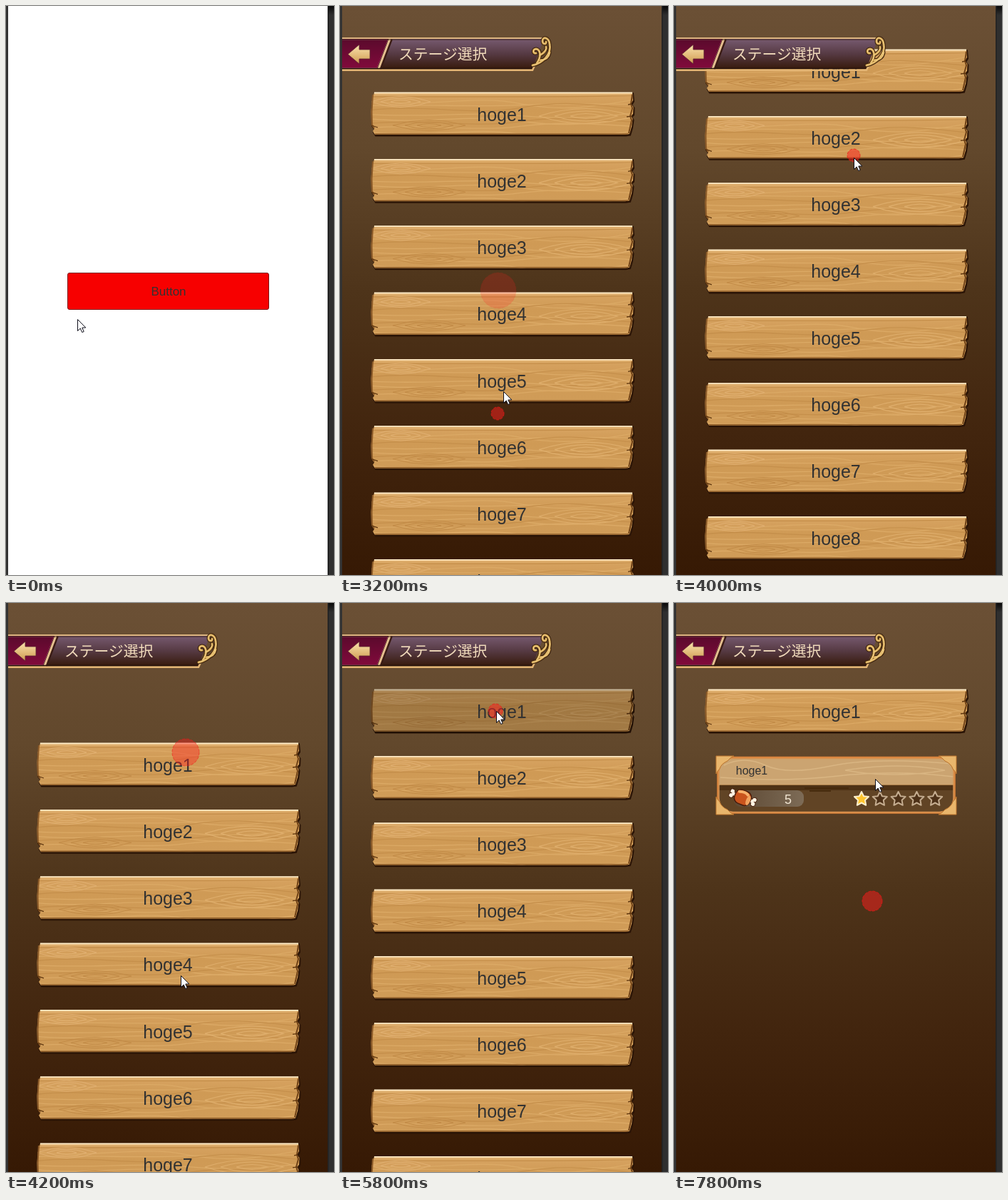
Recreate the animation shown at these times as an HTML page. Size 460 px wide and 796 px high, loop 8000 ms.

```html
<!DOCTYPE html>
<html lang="ja">
<head>
<meta charset="utf-8">
<title>Stage select</title>
<style>
  html, body { margin: 0; width: 100%; height: 100%; overflow: hidden; background: #303030; }
  svg { display: block; width: 460px; height: 796px; }
  text { font-family: "Liberation Sans", Arial, sans-serif; text-anchor: middle; fill: #323232; }
  .title { font: 500 20.8px "Noto Sans CJK JP", "Noto Sans CJK", sans-serif; text-anchor: start; fill: #f2dcbc; }
  .item text { font-size: 25px; }
  .pressed use { filter: brightness(.78); }
</style>
</head>
<body>
<svg viewBox="0 0 460 796">
  <defs>
    <linearGradient id="brown" x2="0" y2="1">
      <stop stop-color="#6b5035"/><stop offset=".25" stop-color="#62482c"/>
      <stop offset=".5" stop-color="#4e341a"/><stop offset=".75" stop-color="#42250e"/>
      <stop offset="1" stop-color="#361904"/>
    </linearGradient>
    <linearGradient id="side" x2="0" y2="1">
      <stop stop-color="#080808"/><stop offset=".016" stop-color="#2f2f2f"/>
    </linearGradient>
    <linearGradient id="plum" x2="0" y2="1">
      <stop stop-color="#775a70"/><stop offset=".5" stop-color="#563a43"/><stop offset="1" stop-color="#371a0c"/>
    </linearGradient>
    <linearGradient id="crimson" x2="0" y2="1">
      <stop stop-color="#5a0a2c"/><stop offset="1" stop-color="#820a3c"/>
    </linearGradient>
    <linearGradient id="gold" x2="0" y2="1">
      <stop stop-color="#fbe3ae"/><stop offset="1" stop-color="#cf9b50"/>
    </linearGradient>
    <linearGradient id="wood" x2="0" y2="1">
      <stop stop-color="#d8a462"/><stop offset=".4" stop-color="#cf9a55"/><stop offset="1" stop-color="#d09c58"/>
    </linearGradient>
    <linearGradient id="pill">
      <stop stop-color="#5d4934"/><stop offset="1" stop-color="#7d6b56"/>
    </linearGradient>
    <path id="board" d="M48 1H410L411 12L408 17L411.500 21L411 31L408 34L410.500 38L409 49L406 59L400 60H49L46 55L48 52L44 46L43.500 28L45 12Z"/>
    <clipPath id="boardClip"><use href="#board"/></clipPath>
    <clipPath id="cardClip"><rect x="62" y="216" width="331" height="78" rx="20"/></clipPath>
    <path id="corner" d="M0 0H25Q20 2 16 7Q7 11 5 18Q2 21 0 25Z" fill="#e9b66c" stroke="#b9732c"/>
    <path id="star" d="M0-10L3.100-3.800L10-3L5 1.800L6.200 8.800L0 5.500L-6.200 8.800L-5 1.800L-10-3L-3.100-3.800Z" stroke-width="2" stroke-linejoin="round"/>
    <g id="plank">
      <use href="#board" transform="translate(1 1.500)" fill="#241003" stroke="#2b1406" stroke-width="2"/>
      <use href="#board" fill="url(#wood)"/>
      <g id="grain" clip-path="url(#boardClip)" fill="none"></g>
      <path d="M48 1.500H410" stroke="#ffebc6" stroke-width="1.800"/>
      <path d="M49 4H408" stroke="#e5b777" stroke-width="2" opacity=".6"/>
      <path d="M46 4L44.500 28L45 46L48 51" fill="none" stroke="#8b5a28" stroke-width="2"/>
      <path d="M410 4L408 17L410 23L407 34L409 40L405 58" fill="none" stroke="#704318" stroke-width="2"/>
      <path d="M49 59H404" stroke="#8b5a27" stroke-width="1.500"/>
      <path d="M44 47L53 50M410 34L402 35M409 17L404 18" stroke="#60370f" stroke-width="1.300"/>
    </g>
  </defs>

  <rect width="460" height="796" fill="#333"/>
  <rect x="451" width="9" height="796" fill="url(#side)"/>
  <rect x="451" width="1.500" height="796" fill="#222"/>

  <g id="start">
    <rect x="3" width="448" height="796" fill="#fff"/>
    <rect id="button" x="86.500" y="373.500" width="282" height="51" rx="2.500" stroke="#7c1414"/>
    <text x="228" y="405" font-size="17">Button</text>
  </g>

  <g id="select">
    <rect x="3" width="448" height="796" fill="url(#brown)"/>
    <g id="list"></g>
    <g id="card">
      <rect x="61.500" y="216" width="332" height="78" fill="#5a3a18"/>
      <g clip-path="url(#cardClip)">
        <path d="M62 216H393V255H62Z" fill="#cba471"/>
        <path d="M62 255H393V262H62Z" fill="#4d3115"/>
        <path d="M62 262H393V294H62Z" fill="#614425"/>
        <path d="M70 227Q98 213 128 227T220 228T392 225M65 244Q150 251 230 242T392 243M240 234Q315 222 380 234Q310 246 240 234" fill="none" stroke="#d9b582" stroke-width="1.500"/>
        <path d="M64 254.500H393" stroke="#a77b47"/>
        <path d="M183 259H245M190 263H220" stroke="#412609" stroke-width="1.500"/>
      </g>
      <rect x="61.500" y="216" width="332" height="77.500" fill="none" stroke="#d9843d" stroke-width="2.500"/>
      <rect x="63" y="217.500" width="329" height="75" rx="20" fill="none" stroke="#d99451" stroke-width="1.500"/>
      <use href="#corner" transform="translate(59 214)"/>
      <use href="#corner" transform="translate(396 214) scale(-1 1)"/>
      <use href="#corner" transform="translate(59 296) scale(1 -1)"/>
      <use href="#corner" transform="translate(396 296) scale(-1)"/>
      <rect x="84" y="262" width="98" height="23" rx="9" fill="url(#pill)"/>
      <text x="109" y="240" font-size="16">hoge1</text>
      <text x="160" y="280.500" font-size="18" style="fill:#f1e5d2">5</text>
      <g transform="translate(96 272) rotate(22)">
        <path d="M-15 0H16" stroke="#4a2410" stroke-width="7"/>
        <g fill="#fff3e2" stroke="#4a2410">
          <circle cx="-16" cy="-3" r="3.300"/><circle cx="-16" cy="3" r="3.300"/>
          <circle cx="17" cy="-3" r="3.300"/><circle cx="17" cy="3" r="3.300"/>
        </g>
        <path d="M-16 0H17" stroke="#fff3e2" stroke-width="4.500"/>
        <rect x="-11" y="-10" width="23" height="20" rx="8" fill="#c9541d" stroke="#4a1c0a" stroke-width="1.500"/>
        <path d="M-7-6Q1-9 6-6" fill="none" stroke="#f6b06a" stroke-width="4" stroke-linecap="round"/>
        <ellipse cx="9" cy="1" rx="3" ry="7" fill="#f0a25e"/>
      </g>
      <g id="stars"></g>
    </g>
    <g id="header">
      <path d="M3 46H286L270 88H3Z" fill="url(#plum)"/>
      <path d="M3 46H69L53 88H3Z" fill="url(#crimson)"/>
      <path d="M3 47.500H67L52 86.500H3" fill="none" stroke="#a34a6c" opacity=".7"/>
      <path d="M71 46L55 88" stroke="#3a1b14" stroke-width="6"/>
      <path d="M70 46L54 88" stroke="#e6bf90" stroke-width="3"/>
      <path d="M3 45H286" stroke="#ddb580" stroke-width="2"/>
      <path d="M3 47H284" stroke="#3b2018"/>
      <path d="M3 87.500H269" stroke="#24100a" stroke-width="1.500"/>
      <path d="M3 89.700H270L273 83" fill="none" stroke="#e4b574" stroke-width="2.500"/>
      <path d="M11 67.500L27 54V61H42V74H27V81Z" fill="url(#gold)" stroke="#5e2630" stroke-width=".8"/>
      <text class="title" x="82" y="75">ステージ選択</text>
      <g id="ornament" fill="none" stroke-linecap="round"></g>
    </g>
  </g>

  <g id="ripples"></g>
  <path id="cursor" d="M.5.500V16.500L4.200 13L6.700 18.500L9.200 17.500L6.800 12H11.800Z" fill="#fff" stroke="#10101c"/>
</svg>
<script>
const LOOP = 8000, STEP = 200, PITCH = 93.33;
const $ = id => document.getElementById(id);

// wood grain: long waves plus two nested knots
const lens = (x, y, w, h) => `M${x - w} ${y}Q${x} ${y - h} ${x + w} ${y}Q${x} ${y + h} ${x - w} ${y}`;
const stroke = (d, color, w) => `<path d="${d}" stroke="${color}" stroke-width="${w}"/>`;
let grain = '';
for (let i = 0; i < 9; i++) {
  const y = 7 + i * 6.2, a = 9 * Math.sin(i * 1.7);
  grain += stroke(`M44 ${y}C120 ${y + a} 190 ${y - a} 250 ${y + a / 3}S350 ${y + a} 412 ${y - 2}`,
    i % 3 ? '#dba965' : '#c58f4b', 1.3);
}
for (let i = 1; i < 4; i++) {
  grain += stroke(lens(85, 14, 14 * i, 5 * i), '#e1b072', 1);
  grain += stroke(lens(345, 34, 22 * i, 7 * i), '#dfae6c', 1.2);
  grain += stroke(lens(125, 47, 17 * i, 5 * i), '#c28b47', 1);
}
$('grain').innerHTML = grain;

// gold scroll work at the end of the header
const curls = 'M270 83C284 80 297 68 294 53C293 44 284 42 284 49C284 54 290 54 289 50' +
  'M276 80C283 70 281 61 275 60C270 60 270 67 275 66M281 76C290 75 293 71 294 65M280 69C288 65 290 60 289 57';
$('ornament').innerHTML = stroke(curls, '#38200e', 5) + stroke(curls, '#d5a552', 3) + stroke(curls, '#f5d994', 1);

$('list').innerHTML = Array.from({ length: 8 }, (_, i) =>
  `<g class="item" transform="translate(0 ${120 + i * PITCH})"><use href="#plank"/>` +
  `<text x="227" y="40.500">hoge${i + 1}</text></g>`).join('');
const items = [...$('list').children];

$('stars').innerHTML = Array.from({ length: 5 }, (_, i) =>
  `<use href="#star" x="${263 + i * 25.8}" y="274" ` +
  (i ? 'fill="#4d3118" stroke="#c5ad90"/>' : 'fill="#ffc52f" stroke="#fff0cd"/>')).join('');

// time, x, y
const pointer = [
  [0, 100, 438], [1000, 222, 397], [2600, 222, 397], [3000, 221, 570], [3200, 229, 539],
  [3600, 253, 234], [3800, 252, 209], [4000, 252, 212], [4200, 245, 521], [4600, 245, 521],
  [5600, 219, 151], [6400, 219, 151], [7600, 278, 417], [7800, 282, 246]
];
// time, list offset
const scroll = [
  [0, 0], [3200, 0], [3400, -58], [3600, -97], [3800, -70], [4000, -60],
  [4200, 75], [4400, 48], [4600, 18], [4800, 5], [5000, 0]
];
// press time, x, y, radius at each step
const taps = [
  [1800, 222, 398, [7, 13, 20, 25, 25, 25, 25, 25]],
  [3200, 221, 570, [9, 20]],
  [4000, 252, 209, [9, 19, 25]],
  [5800, 218, 151, [10, 19]],
  [7800, 278, 417, [14]]
];

function at(track, t) {
  const n = track.findIndex(k => k[0] > t);
  if (n < 0) return track[track.length - 1].slice(1);
  const a = track[n - 1], b = track[n];
  const p = (t - a[0]) / (b[0] - a[0]), e = p * p * (3 - 2 * p);
  return a.slice(1).map((v, i) => v + (b[i + 1] - v) * e);
}

function ripple([start, x, y, radii], t) {
  const r = radii[(t - start) / STEP];
  if (!r) return '';
  const alpha = Math.min(.5, (31 - r) / 30);
  return `<circle cx="${x}" cy="${y}" r="${r}" fill="rgb(255,30,30)" fill-opacity="${alpha}" ` +
    `stroke="#f01414" stroke-opacity="${r > 22 ? .1 : alpha * 1.4}" stroke-dasharray="4 2"/>`;
}

function render(t) {
  const second = t >= 2200, opened = t >= 6200;
  const show = (el, on) => el.setAttribute('display', on ? 'inline' : 'none');
  show($('start'), !second);
  show($('select'), second);
  show($('card'), opened);
  items.forEach((el, i) => show(el, !i || !opened));
  items[0].classList.toggle('pressed', t >= 5800 && t < 6200);
  $('button').setAttribute('fill', t >= 1800 ? '#d00000' : '#f70000');
  $('list').setAttribute('transform', `translate(0 ${at(scroll, t)[0]})`);
  $('cursor').setAttribute('transform', `translate(${at(pointer, t).map(Math.round)})`);
  $('ripples').innerHTML = taps.map(tap => ripple(tap, t)).join('');
}

// the screen refreshes five times a second
let shown = -1;
function tick() {
  const t = Math.floor(performance.now() % LOOP / STEP) * STEP;
  if (t !== shown) render(shown = t);
  requestAnimationFrame(tick);
}
tick();
</script>
</body>
</html>
```
